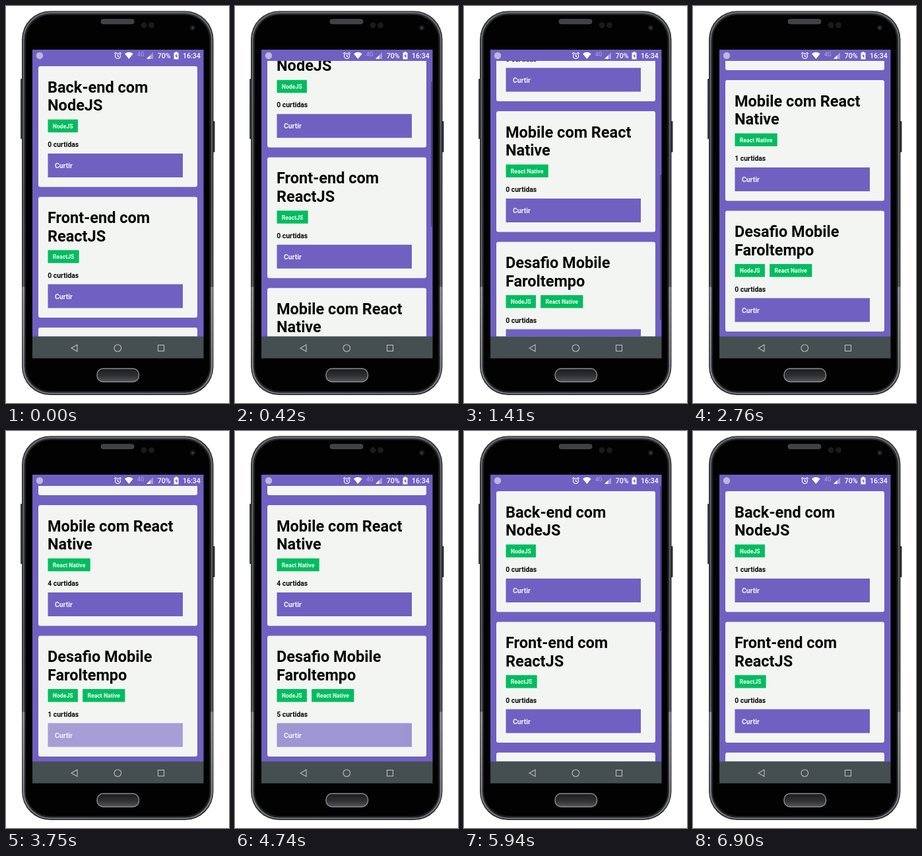
Recreate the animation shown at these times as an HTML page. Size 338 by 600 pixels, loop 6990 ms.

```html
<!DOCTYPE html>
<html lang="pt-BR">
<head>
<meta charset="utf-8">
<title>Curtidas</title>
<style>
  html, body { margin: 0; width: 100%; height: 100%; overflow: hidden; background: #fff; }
  svg { display: block; width: 338px; height: 600px; }
  text { font-family: Roboto, Arial, sans-serif; font-weight: 700; }
  .title { font-size: 23.5px; fill: #050505; }
  .likes { font-size: 10.4px; fill: #080808; }
  .tag { font-size: 8.7px; fill: #f1fff6; }
  .label { font-size: 10.4px; fill: #f5f4fb; }
  .status { font-size: 10.6px; font-weight: 500; fill: #fff; }
</style>
</head>
<body>
<svg viewBox="0 0 338 600">
  <defs>
    <linearGradient id="rim" x1="0" y1="0" x2="0" y2="1">
      <stop offset="0" stop-color="#3a3c40"/>
      <stop offset=".1" stop-color="#2a2b2f"/>
      <stop offset=".719" stop-color="#303136"/>
      <stop offset=".719" stop-color="#55575c"/>
      <stop offset=".93" stop-color="#3b3c41"/>
      <stop offset="1" stop-color="#2a2b2f"/>
    </linearGradient>
    <linearGradient id="edge" x1="0" y1="0" x2="0" y2="1">
      <stop offset="0" stop-color="#77797e"/>
      <stop offset=".5" stop-color="#5c5e63"/>
      <stop offset=".719" stop-color="#696b70"/>
      <stop offset=".719" stop-color="#a5a7ab"/>
      <stop offset="1" stop-color="#85878c"/>
    </linearGradient>
    <linearGradient id="home" x1="0" y1="0" x2="0" y2="1">
      <stop offset="0" stop-color="#1b1c1e"/>
      <stop offset=".55" stop-color="#2f3033"/>
      <stop offset="1" stop-color="#55565a"/>
    </linearGradient>
    <pattern id="mesh" width="2" height="2" patternUnits="userSpaceOnUse">
      <rect width="2" height="2" fill="#4b4c4f"/>
      <rect width="1" height="1" fill="#1d1d1f"/>
    </pattern>
    <clipPath id="view"><rect x="40" y="83" width="259.5" height="416.5"/></clipPath>
  </defs>

  <!-- phone body -->
  <rect x="22" y="110" width="4" height="91" rx="1" fill="#3a3b3f"/>
  <rect x="312" y="174" width="4.5" height="47" rx="1" fill="#2b2c30"/>
  <rect x="24" y="7.5" width="290.5" height="580.5" rx="43" fill="url(#rim)"/>
  <rect x="26.5" y="10" width="285.5" height="575.5" rx="41" fill="none" stroke="url(#edge)" stroke-width="1.6"/>
  <rect x="29.5" y="13" width="279.5" height="569.5" rx="38" fill="#020202" stroke="#1b1c1f" stroke-width="1.5"/>
  <rect x="144" y="20" width="50" height="7" rx="3.5" fill="url(#mesh)" stroke="#56575a" stroke-width=".8"/>
  <g fill="#1a1a1c"><circle cx="209" cy="29" r="4.5"/><circle cx="220.5" cy="29" r="4.5"/></g>
  <circle cx="283" cy="33" r="4.2" fill="#17181b"/>
  <circle cx="283" cy="33" r="1.6" fill="#45474d"/>
  <rect x="138" y="548" width="63.5" height="20" rx="9" fill="url(#home)" stroke="#8b8c90" stroke-width="1.4"/>

  <!-- app -->
  <rect x="40" y="66" width="259.5" height="434" fill="#7060c1"/>
  <g clip-path="url(#view)">
    <g id="list"></g>
    <rect id="bar" x="297" y="83" width="2.5" height="219" fill="#3b3276"/>
  </g>

  <!-- status bar -->
  <circle cx="51" cy="75" r="5.2" fill="#bdb6dd"/>
  <g fill="none" stroke="#fff" stroke-width="1.2">
    <circle cx="169.5" cy="75.5" r="4"/>
    <path d="M169.5 73v2.8l1.8 1.1M164.2 72.2l2.6-2.2M174.8 72.2l-2.6-2.2"/>
  </g>
  <path d="M180 72.2Q186.3 67.4 192.6 72.2L186.3 80Z" fill="#fff"/>
  <text x="199" y="76" class="status" style="font-size:8.4px;fill:#a59bd9">4G</text>
  <path d="M223 70v10h-10Z" fill="#a69cda"/>
  <path d="M218.5 74.5v5.5h-5.5Z" fill="#fff"/>
  <text x="229.7" y="79" class="status">70%</text>
  <path d="M256.5 70.5v-1.3h3v1.3h2v10h-7v-10Z" fill="#fff"/>
  <path d="M258.6 72l-2.4 4h1.6v3l2.4-4h-1.6Z" fill="#7060c1"/>
  <text x="268" y="79" class="status">16:34</text>

  <!-- navigation bar -->
  <rect x="40" y="499.5" width="259.5" height="33" fill="#454e50"/>
  <g fill="none" stroke="#b9bebf" stroke-width="1.1">
    <path d="M108 512v10l-9-5Z"/>
    <circle cx="169.3" cy="517" r="5.3"/>
    <rect x="230.5" y="512.5" width="9" height="9"/>
  </g>
</svg>

<script>
const LOOP = 6990, STEP = 30;
const TOP = 83, VIEW = 416, MAX = 374;
const PITCH = 197.5;

const cards = [
  { title: ['Back-end com', 'NodeJS'], tags: ['NodeJS'], taps: [6540] },
  { title: ['Front-end com', 'ReactJS'], tags: ['ReactJS'], taps: [] },
  { title: ['Mobile com React', 'Native'], tags: ['React Native'], taps: [2400, 2910, 3120, 3330] },
  { title: ['Desafio Mobile', 'Faroltempo'], tags: ['NodeJS', 'React Native'], taps: [3540, 3780, 4020, 4260, 4515] }
];

// time, offset, speed
const flings = [
  [[270, 0, .4], [840, 206, .28], [1410, 327, .15], [1900, MAX, 0]],
  [[4890, MAX, -.5], [5460, 126, -.38], [5910, 0, 0]]
];

const clamp = x => Math.min(1, Math.max(0, x));
const smooth = x => (x = clamp(x), x * x * (3 - 2 * x));
const list = document.getElementById('list');
const bar = document.getElementById('bar');

function add(parent, name, attrs, content) {
  const el = document.createElementNS('http://www.w3.org/2000/svg', name);
  for (const key in attrs) el.setAttribute(key, attrs[key]);
  if (content) el.textContent = content;
  parent.appendChild(el);
  return el;
}

function addText(parent, cls, x, y, content) {
  return add(parent, 'text', { class: cls, x, y }, content);
}

cards.forEach((card, i) => {
  const g = add(list, 'g', { transform: `translate(49 ${91 + i * PITCH})` });
  add(g, 'rect', { width: 241, height: 182.5, rx: 3, fill: '#f3f5f2' });
  card.title.forEach((line, n) => addText(g, 'title', 14, 39.6 + n * 27.5, line));
  let x = 14.5;
  for (const tag of card.tags) {
    const box = add(g, 'rect', { x, y: 80.5, height: 19.5, fill: '#00bd5f' });
    const width = addText(g, 'tag', x + 7.3, 93.9, tag).getComputedTextLength() + 14.6;
    box.setAttribute('width', width);
    x += width + 7.2;
  }
  card.likes = addText(g, 'likes', 14.3, 122.1, '0 curtidas');
  card.button = add(g, 'g', {});
  add(card.button, 'rect', { x: 14.5, y: 132, width: 204.5, height: 36, fill: '#7060c1' });
  addText(card.button, 'label', 25, 154, 'Curtir');
});

// cubic Hermite between two points
function glide([t0, a, va], [t1, b, vb], t) {
  const h = t1 - t0, u = (t - t0) / h, v = 1 - u;
  return a * v * v * (1 + 2 * u) + b * u * u * (3 - 2 * u) + h * u * v * (va * v - vb * u);
}

function scrollAt(t) {
  let y = 0;
  for (const points of flings) {
    for (let i = 1; i < points.length; i++) {
      if (t >= points[i - 1][0]) y = glide(points[i - 1], points[i], Math.min(t, points[i][0]));
    }
  }
  return y;
}

function barAlpha(t) {
  return Math.max(...flings.map(points => {
    const end = points[points.length - 1][0];
    return t < points[0][0] ? 0 : 1 - clamp((t - end - 300) / 250);
  }));
}

function pressAlpha(taps, t) {
  const last = taps.filter(tap => tap <= t).pop();
  if (last === undefined) return 1;
  const dt = t - last;
  return dt < 90 ? 1 - .8 * smooth(dt / 90) : .2 + .8 * smooth((dt - 90) / 250);
}

function render(t) {
  const y = scrollAt(t);
  list.setAttribute('transform', `translate(0 ${-y})`);
  bar.setAttribute('y', TOP + y * VIEW / (VIEW + MAX));
  bar.setAttribute('opacity', .75 * barAlpha(t));
  for (const card of cards) {
    card.likes.textContent = card.taps.filter(tap => tap + 150 <= t).length + ' curtidas';
    card.button.setAttribute('opacity', pressAlpha(card.taps, t));
  }
}

const start = performance.now();
function tick() {
  const t = (performance.now() - start) % LOOP;
  render(Math.min(Math.floor(t / STEP) * STEP, 6900));
  requestAnimationFrame(tick);
}
render(0);
requestAnimationFrame(tick);
</script>
</body>
</html>
```
